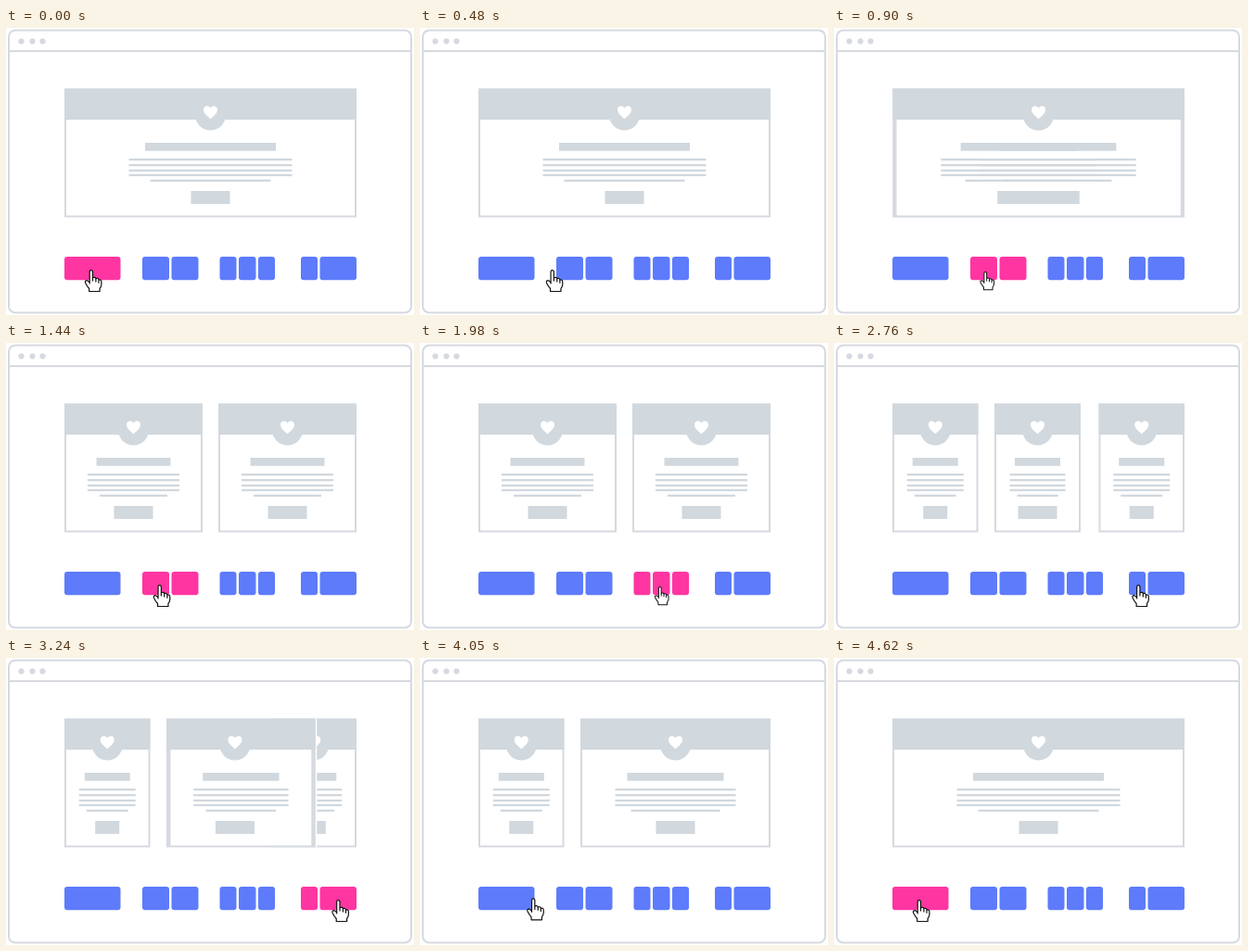
These frames come from a looping animation (440x310 px, 4.68 s). An HTML page with a canvas:

```html
<!DOCTYPE html>
<html lang="en">
<head>
<meta charset="utf-8">
<title>Layout picker</title>
<style>
html, body { margin: 0; width: 100%; height: 100%; overflow: hidden; background: #fff; }
canvas { display: block; }
</style>
</head>
<body>
<canvas id="stage" width="440" height="310"></canvas>
<script>
const ctx = document.getElementById('stage').getContext('2d');
const LOOP = 4680, STEP = 30;
const GRAY = '#d1d8de', LINE = '#d6d9e0', BLUE = '#5d7bfb', PINK = '#ff35a2';

// left, right, heading width, text width, last line width, button width
const FULL = [63, 378, 141, 176, 130, 42];
const HALF_L = [63, 212, 80, 99, 73, 42];
const HALF_R = [229, 378, 80, 99, 73, 42];
const THIRD_L = [63, 155.5, 49, 61, 45, 26];
const THIRD_M = [173, 266, 49, 60, 44, 42];
const THIRD_R = [285.5, 378, 49, 61, 45, 26];
const WIDE = [173, 378, 104, 130, 96, 42];

// button groups: pairs of left, right
const PICKS = [
  [[63, 123.5]],
  [[147, 176], [178.5, 207.5]],
  [[230.5, 248.5], [251, 269.5], [272, 290]],
  [[318, 336], [338.5, 378]]
];

// start, end, from x, to x, from y, to y
const MOVES = [
  [0, 770, 94.5, 165.5, 273, 273],
  [1380, 1870, 165.5, 261, 273, 273],
  [2460, 2950, 261, 361, 273, 273],
  [3630, 4230, 361, 73, 273, 271],
  [4290, 4590, 73, 94.5, 271, 273]
];
const PRESSES = [[780, 1020], [1860, 2100], [2990, 3200]];
// group, from, until
const PICKED = [[0, 0, 210], [1, 780, 1560], [2, 1890, 2610], [3, 2970, 3810], [0, 4620, LOOP]];

const clamp = v => Math.max(0, Math.min(1, v));
const span = (t, a, b) => clamp((t - a) / (b - a));
const ease = u => u < .5 ? 2 * u * u : 1 - 2 * (1 - u) * (1 - u);
const mix = (a, b, p) => a + (b - a) * p;
const center = c => (c[0] + c[1]) / 2;

function box(x0, y0, x1, y1, color) {
  ctx.fillStyle = color;
  ctx.fillRect(x0, y0, x1 - x0, y1 - y0);
}

function round(x0, y0, x1, y1, r) {
  ctx.beginPath();
  ctx.roundRect(x0, y0, x1 - x0, y1 - y0, r);
}

function disc(x, y, r, color) {
  ctx.fillStyle = color;
  ctx.beginPath();
  ctx.arc(x, y, r, 0, Math.PI * 2);
  ctx.fill();
}

function bar(cx, w, y0, y1) {
  box(cx - w / 2, y0, cx + w / 2, y1, GRAY);
}

function heart(cx) {
  ctx.fillStyle = '#fff';
  ctx.beginPath();
  ctx.moveTo(cx, 98.3);
  ctx.bezierCurveTo(cx - 3, 95.5, cx - 7.5, 92.5, cx - 7.5, 88.3);
  ctx.bezierCurveTo(cx - 7.5, 83.5, cx - 2, 83, cx, 86.7);
  ctx.bezierCurveTo(cx + 2, 83, cx + 7.5, 83.5, cx + 7.5, 88.3);
  ctx.bezierCurveTo(cx + 7.5, 92.5, cx + 3, 95.5, cx, 98.3);
  ctx.fill();
}

function still(c) {
  const x = center(c);
  return { x0: c[0], x1: c[1], edge: 2, text: x, icon: x, btn: x, w: c.slice(2) };
}

function morph(a, b, u, body, text, icon, btn) {
  const swell = Math.sin(Math.PI * u);
  const at = p => mix(center(a), center(b), p);
  return {
    x0: mix(a[0], b[0], body), x1: mix(a[1], b[1], body), edge: 2 + 2.5 * swell,
    text: at(text), icon: at(icon), btn: at(btn),
    w: a.slice(2).map((w, i) => mix(w, b[i + 2], text))
  };
}

function drawBody(c) {
  box(c.x0, 65.5, c.x1 + 1.5, 204.5, '#fff');
  box(c.x0, 65.5, c.x1, 204.5, LINE);
  box(c.x0 + c.edge, 99, c.x1 - c.edge, 202.5, '#fff');
  box(c.x0, 65.5, c.x1, 99, GRAY);
}

function drawContent(c) {
  disc(c.icon, 94, 16.5, GRAY);
  heart(c.icon);
  bar(c.text, c.w[0], 124, 132.7);
  for (const y of [141, 147, 152.8, 157.8]) bar(c.text, c.w[1], y, y + 2.3);
  bar(c.text, c.w[2], 163.7, 166);
  bar(c.btn, c.w[3], 176, 190);
}

function drawCard(c) {
  drawBody(c);
  drawContent(c);
}

function drawSplit(u) {
  const lead = ease(u), lag = ease(clamp((u - .34) / .66));
  const swell = Math.sin(Math.PI * u);
  const pair = [HALF_L, HALF_R].map(to => {
    const c = morph(FULL, to, u, lag, lead, lag, lead);
    c.w[1] += 13 * swell;
    c.w[3] += 4.5 * swell;
    return c;
  });
  pair.forEach(drawBody);
  pair.forEach(drawContent);
}

function drawCards(t) {
  if (t <= 800 || t >= 4620) {
    drawCard(still(FULL));
  } else if (t < 1080) {
    drawSplit(span(t, 800, 1080));
  } else if (t <= 2100) {
    drawCard(still(HALF_L));
    drawCard(still(HALF_R));
  } else if (t < 3090) {
    const u = span(t, 2100, 2430), p = ease(u);
    drawCard(still(THIRD_R));
    drawCard(morph(HALF_L, THIRD_L, u, p, p, p, p));
    drawCard(morph(HALF_R, THIRD_M, u, p, p, p, p));
  } else {
    const u = span(t, 3090, 3360), p = ease(u);
    const lag = ease(clamp((u - .12) / .88));
    if (u < 1) drawCard(still(THIRD_R));
    drawCard(still(THIRD_L));
    drawCard(morph(THIRD_M, WIDE, u, p, p, lag, lag));
  }
}

function drawWindow() {
  ctx.strokeStyle = LINE;
  ctx.lineWidth = 2;
  round(3, 2.5, 437, 307.5, 7);
  ctx.stroke();
  box(3, 24, 437, 26, LINE);
  for (const x of [16.5, 28.5, 39.5]) disc(x, 14.3, 3.1, LINE);
}

function drawPicks(t) {
  PICKS.forEach((group, i) => {
    const on = PICKED.some(([g, a, b]) => g === i && t >= a && t < b);
    ctx.fillStyle = on ? PINK : BLUE;
    for (const [a, b] of group) {
      round(a, 247, b, 272.3, 3);
      ctx.fill();
    }
  });
}

function drawHand(t) {
  let x = MOVES[0][2], y = MOVES[0][4], size = 1;
  for (const [a, b, x0, x1, y0, y1] of MOVES) {
    if (t < a) break;
    const p = ease(span(t, a, b));
    x = mix(x0, x1, p);
    y = mix(y0, y1, p);
  }
  for (const [a, b] of PRESSES) size -= .16 * Math.sin(Math.PI * span(t, a, b));

  ctx.save();
  ctx.translate(x, y);
  ctx.scale(size, size);
  ctx.beginPath();
  ctx.moveTo(-4.3, 3);
  ctx.lineTo(-4.3, -9.6);
  ctx.quadraticCurveTo(-4.3, -11.4, -2.7, -11.4);
  ctx.quadraticCurveTo(-1, -11.4, -1, -9.6);
  ctx.lineTo(-1, -3.2);
  ctx.quadraticCurveTo(1.8, -4.4, 2.4, -2.4);
  ctx.quadraticCurveTo(4.9, -3.2, 5.5, -1.1);
  ctx.quadraticCurveTo(8.4, -1.6, 8.4, 1);
  ctx.lineTo(8.4, 4.2);
  ctx.quadraticCurveTo(8.2, 6.5, 6.6, 8.3);
  ctx.lineTo(6.6, 11.5);
  ctx.lineTo(-4.8, 11.5);
  ctx.lineTo(-4.8, 8.5);
  ctx.quadraticCurveTo(-7, 6, -8.8, 2.4);
  ctx.quadraticCurveTo(-9.8, .2, -7.6, -.3);
  ctx.quadraticCurveTo(-6, -.4, -4.3, 2.2);
  ctx.closePath();
  ctx.fillStyle = '#fff';
  ctx.fill();
  ctx.strokeStyle = '#111';
  ctx.lineWidth = 1.2;
  ctx.lineJoin = 'round';
  ctx.stroke();
  ctx.beginPath();
  for (const [fx, fy] of [[-1, -3.2], [2.4, -2.4], [5.5, -1.1]]) {
    ctx.moveTo(fx, fy);
    ctx.lineTo(fx, fy + 3.8);
  }
  ctx.stroke();
  ctx.restore();
}

function draw(now) {
  const t = Math.floor((now % LOOP) / STEP) * STEP;
  box(0, 0, 440, 310, '#fff');
  drawWindow();
  drawCards(t);
  drawPicks(t);
  drawHand(t);
  requestAnimationFrame(draw);
}
draw(0);
</script>
</body>
</html>
```
